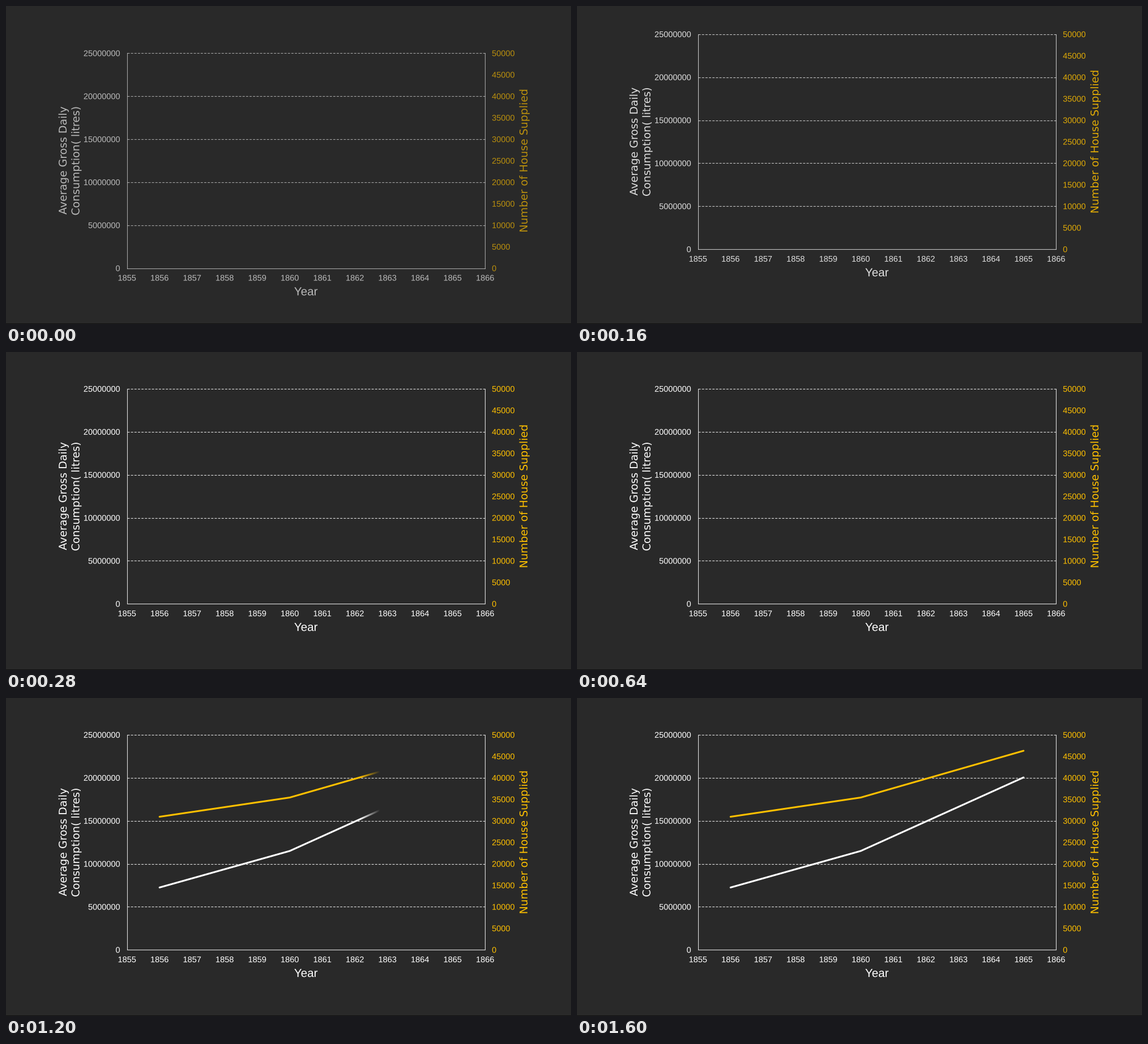
Recreate the animation shown at these times as a matplotlib script. Size 998 px wide and 561 px high, loop 1.96 s.

```python
import matplotlib.pyplot as plt
from matplotlib.animation import FuncAnimation
from matplotlib.patches import PathPatch, Rectangle
from matplotlib.textpath import TextPath
from matplotlib.transforms import Affine2D, Bbox, TransformedBbox

W, H, DPI = 998, 561, 100
STEP, FRAMES = 40, 49
PT = 72 / DPI  # points per pixel

BACK, WHITE, GOLD, RULE = "#292929", "#ffffff", "#ffc000", "#e0e0e0"
LEFT, RIGHT, TOP, BASE = 213.7, 846.3, 65.0, 444.3
YEAR_GAP = (RIGHT - LEFT) / 11
TICK, TITLE = 14.55, 18.9
DIGIT = 0.556 * TICK  # advance of one digit

FADE = 34       # width of the soft wipe edge
SPEED = 1.035   # wipe speed in px per ms

fig = plt.figure(figsize=(W / DPI, H / DPI), dpi=DPI, facecolor=BACK)
ax = fig.add_axes([0, 0, 1, 1])
ax.set_xlim(0, W)
ax.set_ylim(H, 0)
ax.axis("off")

shift = Affine2D()  # moves the whole chart frame
frame_parts = []


def label(text, x, y, size, color=WHITE, font="Liberation Sans", angle=0):
    """Place text with its baseline origin at x, y."""
    path = TextPath((0, 0), text, size=size, prop={"family": font})
    place = Affine2D().scale(1, -1).rotate_deg(-angle).translate(x, y)
    patch = PathPatch(place.transform_path(path), facecolor=color, linewidth=0,
                      snap=False, transform=shift + ax.transData)
    frame_parts.append(ax.add_patch(patch))


def rule(xs, ys, **style):
    line, = ax.plot(xs, ys, color=RULE, lw=1.1 * PT,
                    transform=shift + ax.transData, **style)
    frame_parts.append(line)


def side_title(text, x, y, color=WHITE):
    label(text, x, y, TITLE, color, "DejaVu Sans", 90)


def height(share):
    return BASE + (TOP - BASE) * share


def build_frame():
    for k in range(6):
        y = height(k / 5)
        text = str(k * 5000000)
        label(text, 201.6 - DIGIT * len(text), y + 5.1, TICK)
        if k:
            rule([LEFT, RIGHT], [y, y], dashes=(3.6, 2.0),
                 dash_capstyle="butt")
    for k in range(11):
        label(str(k * 5000), 858.2, height(k / 10) + 5.1, TICK, GOLD)
    for k in range(12):
        label(str(1855 + k), LEFT + k * YEAR_GAP - 2 * DIGIT, BASE + 21.9, TICK)
    rule([LEFT, RIGHT], [BASE, BASE])
    rule([LEFT, LEFT], [TOP, BASE])
    rule([RIGHT, RIGHT], [TOP, BASE])
    label("Year", 508.9, 492.1, 20.6)
    side_title("Average Gross Daily", 107, 349.6)
    side_title("Consumption( litres)", 129.5, 351.2)
    side_title("Number of House Supplied", 921, 381.3, GOLD)


class Wipe:
    """A polyline revealed from the left behind a soft edge."""

    def __init__(self, shares, color):
        xs = [LEFT + (year - 1855) * YEAR_GAP for year in (1856, 1860, 1865)]
        ys = [height(s) for s in shares]
        # the first strip is the solid part, the others are 1 px wide
        self.strips = [
            ax.plot(xs, ys, color=color, lw=3.1 * PT, solid_capstyle="round",
                    solid_joinstyle="round", zorder=4)[0]
            for _ in range(FADE + 1)]

    def reveal(self, front):
        solid = front - FADE
        for k, line in enumerate(self.strips):
            x0, x1 = (0, solid) if k == 0 else (solid + k - 1, solid + k)
            line.set_visible(front > 0)
            line.set_alpha(1 - k / (FADE + 1))
            box = Bbox.from_extents(x0, 0, x1, H)
            line.set_clip_box(TransformedBbox(box, ax.transData))


def rise_progress(i):
    return 0.678 if i < 3 else min(1, 0.8 + 0.052 * (i - 3))


def rise_offset(t):
    """Slow down past the rest position, then drop back onto it."""
    if t < 0.9:
        return H * (1.03 * (1 - t / 0.9) ** 2 - 0.03)
    return H * 0.03 * (((t - 0.9) / 0.1) ** 2 - 1)


build_frame()
ax.add_patch(Rectangle((0, H - 1), W, 1, facecolor="#101010", linewidth=0))
wipes = [Wipe((0.29, 0.46, 0.802), WHITE),
         Wipe((0.619, 0.7085, 0.926), GOLD)]


def draw(i):
    t = rise_progress(i)
    shift.clear().translate(0, rise_offset(t))
    for part in frame_parts:
        part.set_alpha(t)
    ms = i * STEP
    front = round(453 + SPEED * (ms - 1000)) if ms >= 840 else 0
    for wipe in wipes:
        wipe.reveal(min(front, W))
    return []


anim = FuncAnimation(fig, draw, frames=FRAMES, interval=STEP,
                     repeat=True, repeat_delay=0, blit=False)
plt.show()
```
